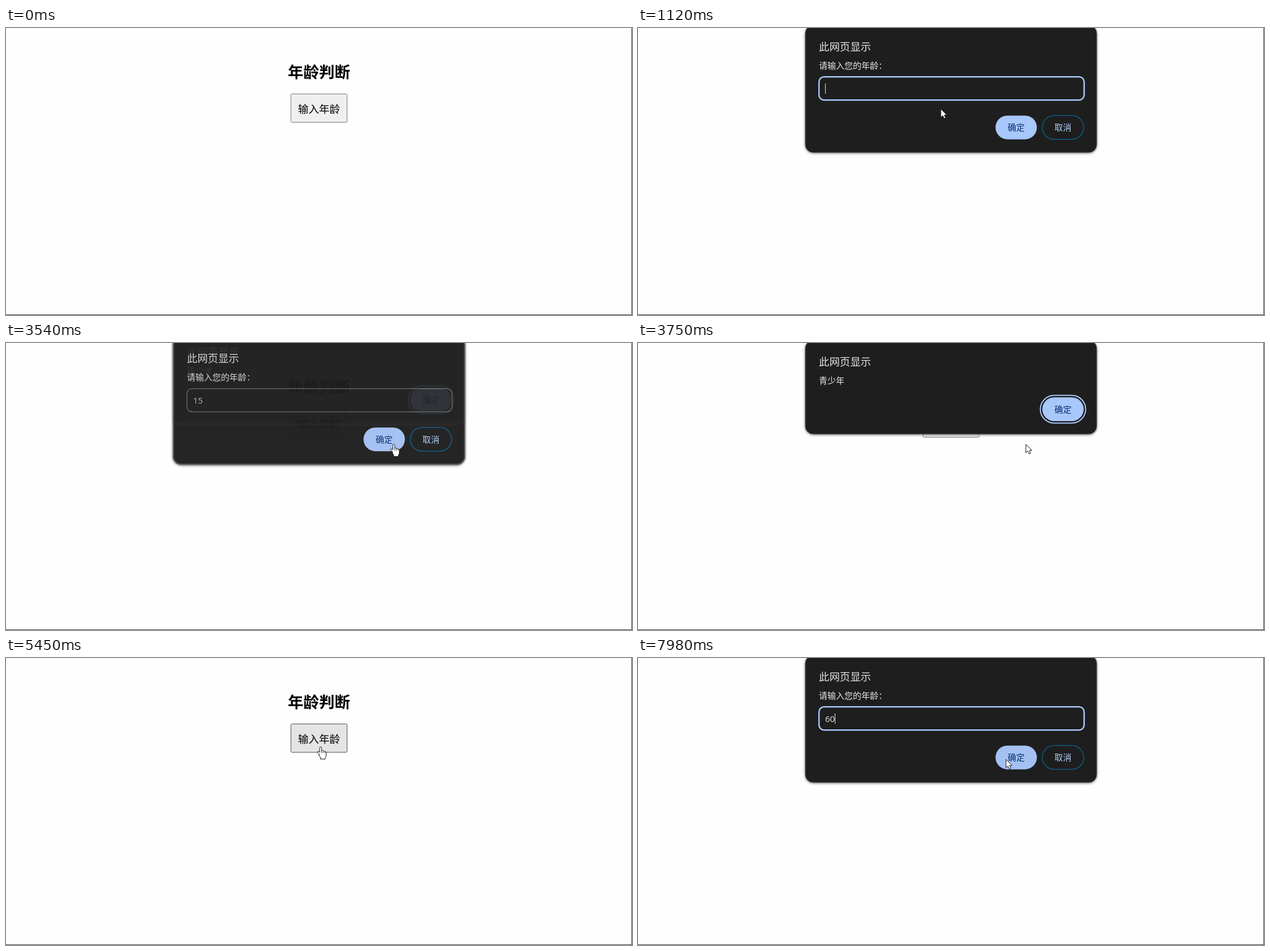
An HTML page for the animation above (8000 ms loop, 1104 px wide and 507 px high).

```html
<!DOCTYPE html>
<html lang="zh-CN">
<head>
<meta charset="utf-8">
<title>年龄判断</title>
<style>
  html, body { margin: 0; width: 100%; height: 100%; overflow: hidden; background: #fefefe; }
  svg { display: block; width: 1104px; height: 507px; font-family: "Noto Sans CJK SC", "Noto Sans CJK", sans-serif; }
  .panel { fill: #1e1e1e; stroke: #5c5c5c; filter: drop-shadow(0 1px 2px rgba(0, 0, 0, .5)); }
  .title { font-size: 18.4px; fill: #e3e3e3; }
  .body { font-size: 15px; fill: #e8e8e8; }
  .label { font-size: 15px; text-anchor: middle; fill: #062e6f; }
  .ok { fill: #a8c7fa; }
  .ok.hover { fill: #a4c1f2; }
  .cancel { fill: none; stroke: #0a6797; stroke-width: 1.3; }
  .cancel + .label { fill: #b4cffb; }
  .digits { font: 15px "Open Sans", sans-serif; fill: #c8c8c8; }
  .field { fill: none; stroke: #757575; stroke-width: 1.2; }
  .active .digits { fill: #e8e8e8; }
  .active .field { stroke: #a8c7fa; stroke-width: 2.5; }
  .page-button { fill: #efefef; stroke: #767676; }
  .page-button.hover { fill: #e4e4e4; stroke: #4f4f4f; }
  .page-button.pressed { fill: #f5f5f5; stroke: #8d8d8d; }
  .pointer { fill: #fff; stroke: #111; stroke-linejoin: round; }
</style>
</head>
<body>
<svg id="stage" viewBox="0 0 1104 507"></svg>
<script>
const LOOP = 8000, FADE = 200, BLINK = 530;

const dialog = (id, height, message, content) => `
  <g id="${id}">
    <rect class="panel" x="295" y="-4.5" width="514" height="${height}" rx="14"/>
    <text class="title" x="319" y="40">此网页显示</text>
    <text class="body" x="319" y="71.7">${message}</text>
    ${content}
  </g>`;

const pill = (kind, x, y, label) => `
  <rect class="${kind}" x="${x}" y="${y}" width="73" height="42" rx="21"/>
  <text class="label" x="${x + 36.5}" y="${y + 26.7}">${label}</text>`;

document.getElementById('stage').innerHTML = `
  <text x="552" y="88.3" text-anchor="middle" font-size="27.5" font-weight="700">年龄判断</text>
  <rect id="button" class="page-button" x="502.5" y="116.5" width="99" height="50" rx="2"/>
  <text x="552" y="149.8" text-anchor="middle" font-size="18.5" font-weight="300">输入年龄</text>
  <path d="M1103.5 0V506.5H0" fill="none" stroke="#444"/>
  ${dialog('prompt', 224.5, '请输入您的年龄：', `
    <rect class="field" x="319.2" y="86.2" width="467.6" height="41" rx="9"/>
    <text id="value" class="digits" x="330" y="112.5"></text>
    <path id="caret" d="M0 98V116" stroke="#e8e8e8"/>
    ${pill('ok', 630.5, 154.7, '确定')}
    ${pill('cancel', 713, 154.7, '取消')}`)}
  ${dialog('alert', 165.5, '青少年', `
    <rect id="ring" x="709.5" y="92.5" width="80" height="49" rx="24.5" fill="none" stroke="#a8c7fa" stroke-width="2"/>
    ${pill('ok', 713, 96, '确定')}`)}
  <g id="cursor">
    <path id="arrow" class="pointer" d="M0 0V15L3.5 11.8L6 17L8.6 15.8L6.2 10.8H10.8Z"/>
    <g id="hand">
      <path class="pointer" d="M-1.7 14L-5 10.6Q-6.5 8.8-5 8Q-3.8 7.6-1.7 9.6V1.5Q-1.7 0 0 0Q1.7 0 1.7 1.5V6.8Q4 5.8 4.7 7.4Q7 6.7 7.5 8.4Q9.8 8 9.8 10V14Q9.8 17 8 19V21.5H-.5V19Q-1 17-3.5 14Z"/>
      <path d="M1.7 7V11M4.7 7.6V11M7.5 8.6V11" stroke="#111" stroke-width=".9"/>
    </g>
    <path id="beam" d="M-3-7.5H-1L0-7L1-7.5H3M0-7V7M-3 7.5H-1L0 7L1 7.5H3" fill="none" stroke="#d0d0d0"/>
  </g>`;

// One round: press the page button, get the prompt, type an age.
const rounds = [
  { press: 840, opens: 900, closes: 3505, age: '15', keys: [2160, 3000] },
  { press: 5680, opens: 5720, closes: LOOP, age: '60', keys: [7180, 7520] }
];
const notice = { opens: 3524, closes: 4815 };

const entry = { x: 556, y: 530 };
const moves = [
  { from: 30, until: 470, x: 534, y: 143 },     // page button
  { from: 1270, until: 1570, x: 562, y: 106 },  // field
  { from: 1750, until: 2550, x: 591, y: 120 },  // along the field
  { from: 2920, until: 3340, x: 684, y: 179 },  // prompt's OK
  { from: 3850, until: 4650, x: 762, y: 112 },  // alert's OK
  { from: 4860, until: 5120, x: 650, y: 424 },  // below the button
  { from: 5120, until: 5450, x: 555, y: 157 },  // page button
  { from: 5640, until: 5900, x: 563, y: 99 },   // field
  { from: 7550, until: 7980, x: 649, y: 179 }   // prompt's OK
];

const $ = id => document.getElementById(id);
const ramp = (t, from, until) => Math.max(0, Math.min(1, (t - from) / (until - from)));
const smooth = p => p * p * (3 - 2 * p);
const during = (t, from, until) => t >= from && t < until;
const show = (node, visible) => node.style.display = visible ? '' : 'none';
const inside = (p, left, top, right, bottom) => p.x >= left && p.x <= right && p.y >= top && p.y <= bottom;

const pointerAt = t => moves.reduce((at, move) => {
  const p = smooth(ramp(t, move.from, move.until));
  return { x: at.x + (move.x - at.x) * p, y: at.y + (move.y - at.y) * p };
}, entry);

// Dialogs drop in while fading up, and lift away while fading out.
function placeDialog(node, t, { opens, closes }) {
  const enter = ramp(t, opens, opens + FADE), leave = ramp(t, closes, closes + FADE);
  const lift = 20 * (1 - enter) ** 2 + 17 * (1 - (1 - leave) ** 2);
  node.setAttribute('transform', `translate(0 ${-lift})`);
  node.setAttribute('opacity', enter * (1 - leave ** 2));
  node.querySelector('.panel').setAttribute('stroke-width', 1 + lift / 4);
  show(node, enter > 0 && leave < 1);
}

function drawPrompt(t, round, point) {
  const active = t < round.closes;
  const typed = round.keys.filter(key => key <= t);
  const lastInput = typed.at(-1) ?? round.opens;
  placeDialog($('prompt'), t, round);
  $('prompt').classList.toggle('active', active);
  $('prompt').querySelector('.ok').classList.toggle('hover', inside(point, 630, 154, 704, 197));
  $('value').textContent = round.age.slice(0, typed.length);
  $('caret').setAttribute('transform', `translate(${330.5 + Math.round(typed.length * 8.6)} 0)`);
  show($('caret'), active && (t - lastInput) % (2 * BLINK) < BLINK);
}

function drawPointer(t, round, point, overButton) {
  const prompting = during(t, round.opens, round.closes);
  const beam = prompting && inside(point, 319, 86, 787, 127);
  const hand = overButton || during(t, round.closes, round.closes + FADE);
  $('cursor').setAttribute('transform', `translate(${Math.round(point.x)} ${Math.round(point.y)})`);
  show($('beam'), beam);
  show($('hand'), hand);
  show($('arrow'), !beam && !hand);
}

function draw(t) {
  const point = pointerAt(t);
  const round = rounds[t < rounds[1].press ? 0 : 1];
  const pageFree = t < round.opens || during(t, notice.closes, rounds[1].opens);
  const overButton = pageFree && inside(point, 502, 116, 602, 167);
  $('button').classList.toggle('hover', overButton);
  $('button').classList.toggle('pressed', during(t, round.press, round.opens));
  drawPrompt(t, round, point);
  placeDialog($('alert'), t, notice);
  show($('ring'), t < notice.closes);
  drawPointer(t, round, point, overButton);
}

const start = performance.now();
function tick() {
  draw((performance.now() - start) % LOOP);
  requestAnimationFrame(tick);
}
tick();
</script>
</body>
</html>
```
